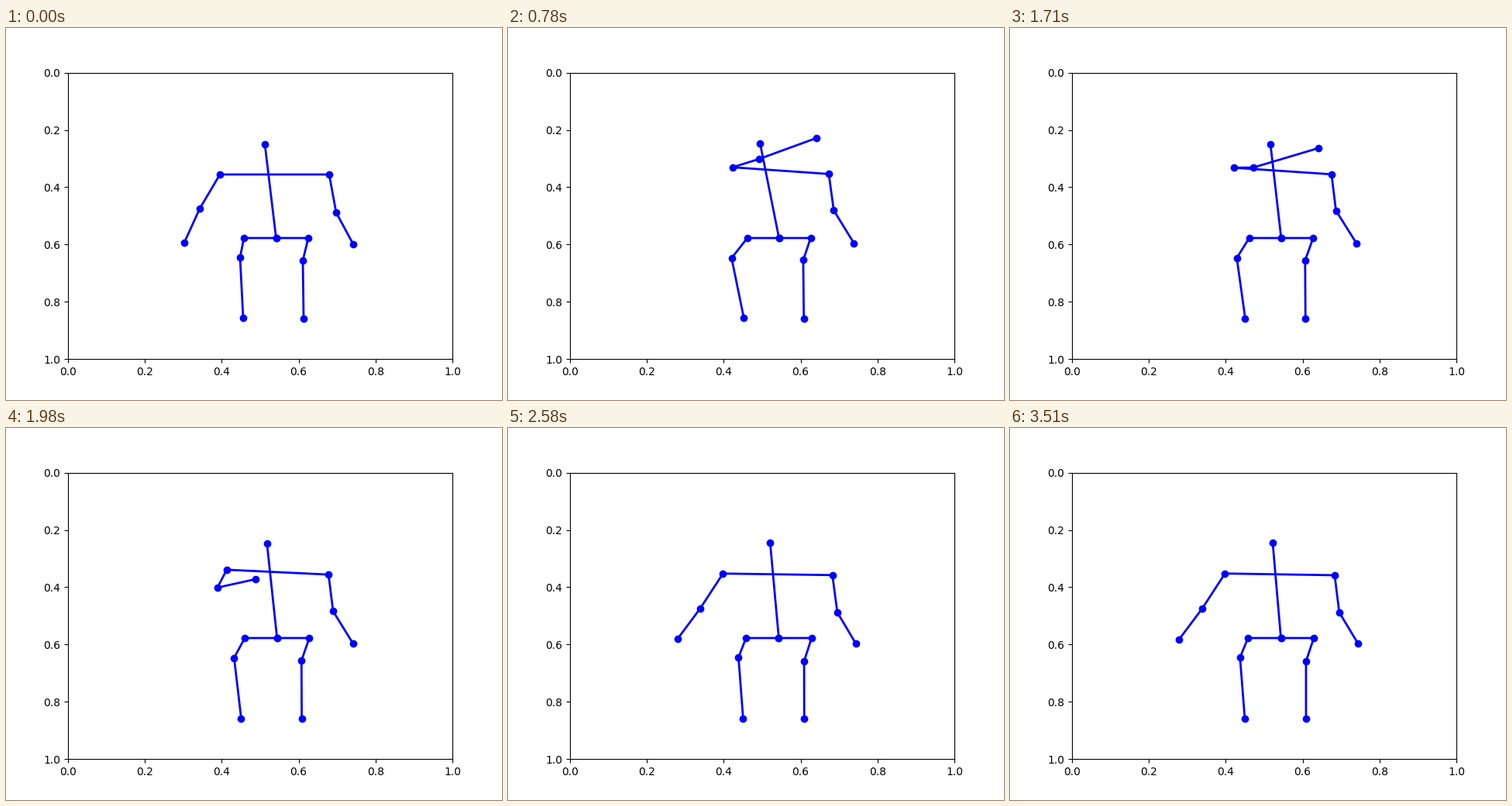
Write a matplotlib script that moves like this. It is 640x480 px and loops after 3.54 s.

```python
import numpy as np
import matplotlib.pyplot as plt
from matplotlib.animation import FuncAnimation

WIDTH, HEIGHT, DPI = 640, 480, 100
FRAMES, STEP = 118, 30  # step in ms

# Standing pose, in stage pixels
REST = {
    "head": (334, 150),
    "shoulder_l": (276, 189), "shoulder_r": (417, 189),
    "elbow_r": (426, 238), "wrist_r": (448, 279),
    "hip_l": (307, 271), "hip_r": (390, 271),
    "knee_l": (302, 296), "knee_r": (383, 300),
    "ankle_l": (306, 374), "ankle_r": (384, 375),
}
# How the body shifts with the raised arm, over time, and in the early lean
LIFT = {
    "head": (-1, 1), "shoulder_l": (15, -10), "shoulder_r": (-4, -1),
    "elbow_r": (-6, -3), "wrist_r": (-2, -1), "hip_l": (2, 0),
    "knee_l": (-8, 1), "knee_r": (-2, -1), "ankle_l": (-1, 0), "ankle_r": (-2, 0),
}
SETTLE = {
    "head": (5, -2), "shoulder_l": (1, -1), "shoulder_r": (2, 1),
    "elbow_r": (-1, 0), "wrist_r": (1, -1), "hip_r": (2, 0),
    "knee_l": (-5, 0), "knee_r": (-1, 1), "ankle_l": (-3, 1), "ankle_r": (-2, 0),
}
LEAN = {"head": (-9, -1), "knee_l": (-5, 0)}

# Key poses of the waving arm
ARM_TIMES = [0, 780, 1200, 1710, 2220, 2640]
ELBOW = [(250, 233), (324, 169), (359, 157), (314, 180), (249, 225), (248, 233)]
WRIST = [(230, 277), (398, 142), (440, 127), (398, 155), (256, 234), (218, 273)]

CHAINS = [
    ("head", "hip_mid"),
    ("wrist_l", "elbow_l", "shoulder_l", "shoulder_r", "elbow_r", "wrist_r"),
    ("ankle_l", "knee_l", "hip_l", "hip_mid", "hip_r", "knee_r", "ankle_r"),
]


def glide(times, values, t):
    """Cubic path through key values, without overshoot and at rest at both ends."""
    times, values = np.array(times, float), np.array(values, float)
    t = np.clip(t, times[0], times[-1])
    h = np.diff(times)
    d = np.diff(values) / h
    slope = np.zeros(len(times))
    for i, (a, b) in enumerate(zip(d, d[1:]), start=1):
        if a * b > 0:
            slope[i] = 2 * a * b / (a + b)
    k = np.clip(np.searchsorted(times, t, side="right") - 1, 0, len(h) - 1)
    u = (t - times[k]) / h[k]
    ease = u * u * (3 - 2 * u)
    bend = u * (1 - u) * h[k] * ((1 - u) * slope[k] - u * slope[k + 1])
    return values[k] + ease * (values[k + 1] - values[k]) + bend


def make_tracks():
    t = np.arange(FRAMES) * STEP
    tracks = {
        name: np.array([glide(ARM_TIMES, axis, t) for axis in zip(*keys)])
        for name, keys in (("elbow_l", ELBOW), ("wrist_l", WRIST))
    }
    wrist_y = tracks["wrist_l"][1]
    lift = (wrist_y[0] - wrist_y) / np.ptp(wrist_y)
    settle = np.minimum(t / 3000, 1)
    lean = np.exp(-((t - 780) / 250) ** 2)
    for name, rest in REST.items():
        tracks[name] = np.outer(rest, np.ones(FRAMES))
        for shifts, amount in ((LIFT, lift), (SETTLE, settle), (LEAN, lean)):
            tracks[name] += np.outer(shifts.get(name, (0, 0)), amount)
    tracks["hip_mid"] = (tracks["hip_l"] + tracks["hip_r"]) / 2
    return tracks


def to_data(points):
    x, y = points
    return (x - 80) / 496, (y - 57.6) / 369.6


fig = plt.figure(figsize=(WIDTH / DPI, HEIGHT / DPI), dpi=DPI)
ax = fig.add_axes([0.125, 0.11, 0.775, 0.77])
ax.set_xlim(0, 1)
ax.set_ylim(1, 0)

TRACKS = make_tracks()
lines = [ax.plot([], [], "bo-", lw=2)[0] for _ in CHAINS]


def draw(frame):
    for line, chain in zip(lines, CHAINS):
        points = np.array([TRACKS[name][:, frame] for name in chain]).T
        line.set_data(*to_data(points))
    return lines


anim = FuncAnimation(fig, draw, frames=FRAMES, interval=STEP,
                     init_func=lambda: draw(0), repeat=True, repeat_delay=0)
plt.show()
```
